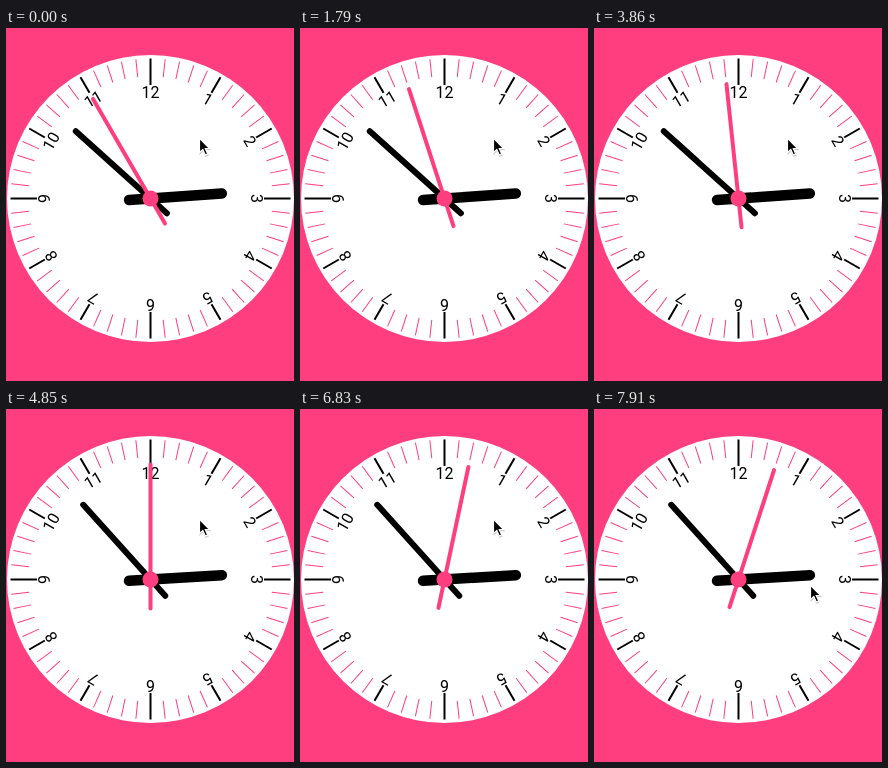
Write an HTML page that moves like this. It is 288 by 353 pixels and loops after 8 s.

```html
<!DOCTYPE html>
<html lang="en">
<head>
<meta charset="utf-8">
<title>Clock</title>
<style>
  html, body { margin: 0; width: 100%; height: 100%; overflow: hidden; background: #ff3e80; }
  svg { display: block; }
  text { font: 16px Roboto, sans-serif; text-anchor: middle; }
  line { stroke: #000; }
  .hand { stroke-linecap: round; }
  .minor, #second { stroke: #ff3e80; }
</style>
</head>
<body>
<svg width="288" height="353" viewBox="0 0 288 353">
  <g transform="translate(144.5 170.5)">
    <circle r="143.5" fill="#fff"/>
    <g id="dial"></g>
    <line id="hour" class="hand" y1="21.5" y2="-71.5" stroke-width="10.5"/>
    <line id="minute" class="hand" y1="22" y2="-100.5" stroke-width="6"/>
    <line id="second" class="hand" y1="29" y2="-115" stroke-width="4"/>
    <circle r="8" fill="#ff3e80"/>
  </g>
  <g id="cursor">
    <path d="M0 0V16.5L3.6 13.2L6 18.5L9.4 17L7.1 11.8H12Z" transform="translate(.4 1)" fill="#000" opacity=".2"/>
    <path d="M.5 .8V15L3.8 12L6.3 17.5L8.7 16.4L6.3 11H10.6Z" stroke="#fff" stroke-width="1.2"/>
  </g>
</svg>
<script>
const LOOP = 8000;
const TICKS = [810, 1790, 2870, 3860, 4850, 5840, 6830, 7820];
const START = (2 * 60 + 51) * 60 + 60 + 55; // 2:52:55 in seconds
const CURSOR_MOVE = 7910;
const $ = id => document.getElementById(id);

function buildDial() {
  let marks = '';
  for (let i = 0; i < 60; i++) {
    const isHour = i % 5 === 0;
    const inner = i % 15 === 0 ? 113.5 : 122;
    const label = isHour ? `<text y="${18.5 - inner - 5.5}">${i / 5 || 12}</text>` : '';
    marks += `<g transform="rotate(${i * 6})">
      <line class="${isHour ? 'major' : 'minor'}" y1="${-inner}" y2="-140" stroke-width="${isHour ? 2 : 1}"/>
      ${label}</g>`;
  }
  $('dial').innerHTML = marks;
}

const turn = (id, angle) => $(id).setAttribute('transform', `rotate(${angle})`);

function draw(now) {
  const t = now % LOOP;
  const time = START + TICKS.filter(tick => t >= tick).length;
  const minutes = Math.floor(time / 60);
  turn('second', time % 60 * 6);
  turn('minute', minutes % 60 * 6);
  turn('hour', minutes / 2);
  $('cursor').setAttribute('transform',
    t < CURSOR_MOVE ? 'translate(193 109.5)' : 'translate(216 175.5)');
  requestAnimationFrame(draw);
}

buildDial();
draw(0);
</script>
</body>
</html>
```
